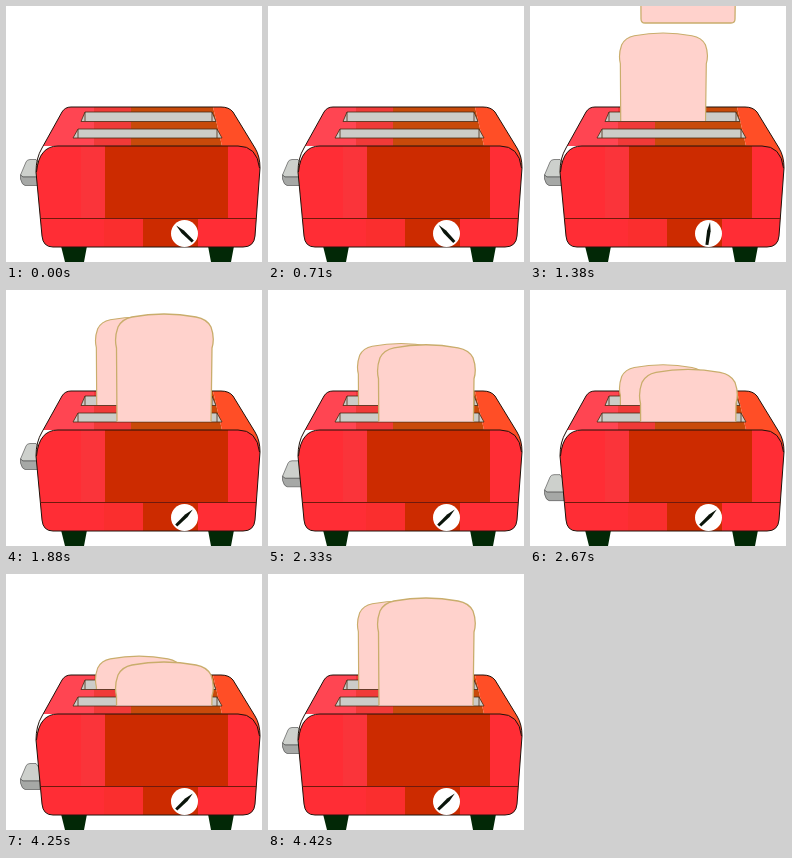
Animation, 256 px wide and 256 px high, one loop 5.58 s. Source, as an HTML page:

```html
<!DOCTYPE html>
<html>
<head>
<meta charset="utf-8">
<title>Toaster</title>
<style>
html, body { margin: 0; width: 100%; height: 100%; overflow: hidden; background: #fff; }
svg { display: block; width: 100vw; height: 100vh; }
</style>
</head>
<body>
<svg viewBox="0 0 256 256">
  <defs>
    <path id="bread" d="M2 109 L1.500 34 Q-1 24 3 13 Q7 5 17 3 Q49 -3 81 3 Q92 5 96 13 Q100 24 97 34 L96 109 Q96 113 92 113 H6 Q2 113 2 109Z"
      fill="#ffd2cc" stroke="#c9ad6c" stroke-width="1.300"/>
    <path id="body" d="M65 101 H215 Q223 101 227 106 L249 142 Q254 150 254 162 L249 230 Q248 241 237 241 H47 Q37 241 36 230 L30 166 Q30 152 36 142 L56 106 Q59 101 65 101Z"/>
    <clipPath id="bodyClip"><use href="#body"/></clipPath>
    <clipPath id="backClip"><rect width="256" height="115"/></clipPath>
    <clipPath id="frontClip"><rect width="256" height="131.500"/></clipPath>
  </defs>

  <g id="lever" stroke="#444" stroke-width=".6">
    <path d="M14.500 169 L20 156 Q21 153.500 24 153.500 H30 L34 159 V171 H17Z" fill="#cdd0cc"/>
    <path d="M14.500 169 L17 171 H34 V179.500 H19 Q16 179 14.500 173Z" fill="#a6a8a6"/>
  </g>

  <path d="M55 240 H81 L78 256 H59Z M202 240 H228 L225 256 H205Z" fill="#022806"/>

  <!-- body -->
  <g clip-path="url(#bodyClip)">
    <path d="M30 101 H88 V140 H30Z" fill="#ff4552"/>
    <path d="M88 101 H126 V140 H88Z" fill="#f03a38"/>
    <path d="M125 101 H207 L216 140 H125Z" fill="#c84a0a"/>
    <path d="M207 101 H256 V160 H222 L216 140Z" fill="#ff4e26"/>
    <path d="M30 241 V166 Q33 140 52 140 H232 Q251 140 254 162 V241Z" fill="#ff2d35"/>
    <path d="M75 140 H99 V212 H75Z" fill="#fa343a"/>
    <path d="M99 140 H222 V212 H99Z" fill="#cc2b00"/>
    <path d="M98 212 H137 V241 H98Z" fill="#fa2e2e"/>
    <path d="M137 212 H192 V241 H137Z" fill="#cc2b00"/>
  </g>
  <g fill="none" stroke="#20120a">
    <use href="#body"/>
    <path d="M30.500 166 Q33 140 52 140 H232 Q251 140 253.500 162"/>
    <path d="M34.500 212.500 H250.500" stroke="#701a0c"/>
  </g>
  <g fill="#ccccc8" stroke="#4a2a14" stroke-width=".8">
    <path d="M79 106 H206 L210 115.500 H75Z M79 106 V115 M206 106 V115"/>
    <path d="M72 123 H211 L216 132 H67Z M72 123 V132 M211 123 V132"/>
  </g>

  <g clip-path="url(#backClip)"><use id="back" href="#bread"/></g>
  <g clip-path="url(#frontClip)"><use id="front" href="#bread"/></g>

  <circle cx="178.500" cy="227.500" r="13.500" fill="#fff"/>
  <path id="dial" d="M178.500 216 L180.300 225 L180 239 H177 L176.700 225Z" fill="#0a140a"/>
</svg>
<script>
const LOOP = 5580, FPS = 24;
const [lever, back, front, dial] = ["lever", "back", "front", "dial"].map(id => document.getElementById(id));

// Linear progress from step a to step b, clamped to 0..1
const ramp = (n, a, b) => Math.min(1, Math.max(0, (n - a) / (b - a)));
const move = (el, value) => el.setAttribute("transform", value);

function draw(time) {
  const step = Math.floor((time % LOOP + 4) * FPS / 1000);
  const down = ramp(step, 46, 72) - ramp(step, 101, 106);
  const backY = 27 - 140 * (1 - ramp(step, 16, 31)) + 69 * down;
  const frontY = 24 - 140 * (1 - ramp(step, 31, 45)) + 80 * down;

  move(lever, `translate(0 ${45 * down})`);
  move(back, `translate(89 ${backY}) scale(.9)`);
  move(front, `translate(109 ${frontY})`);
  move(dial, `rotate(${-46 + 92 * ramp(step, 16, 45)} 178.5 227.5)`);
}

const start = performance.now();
function tick() {
  draw(performance.now() - start);
  requestAnimationFrame(tick);
}
tick();
</script>
</body>
</html>
```
